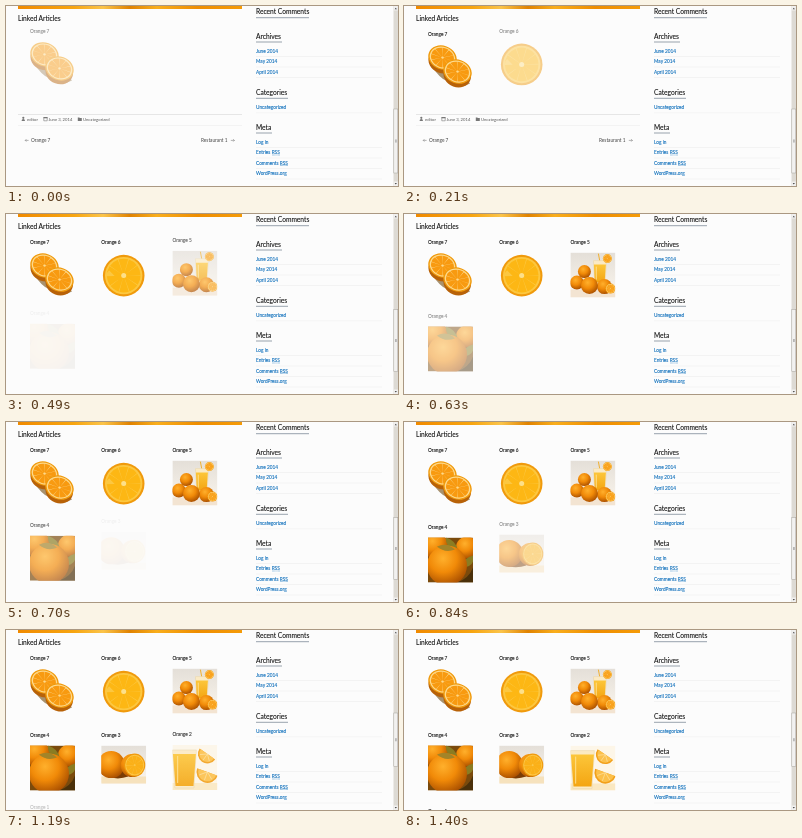
An HTML page for the animation above (2100 ms loop, 392 by 180 pixels).

```html
<!DOCTYPE html>
<html lang="en">
<head>
<meta charset="utf-8">
<style>
html, body { margin: 0; width: 100%; height: 100%; overflow: hidden; background: #fcfcfc; }
svg { display: block; }
text { font: 4.75px Lato, sans-serif; fill: #111; stroke: #111; stroke-width: .08; white-space: pre; }
.head { font-size: 6.65px; }
.link { fill: #0068b8; stroke: #0068b8; }
.meta { font-size: 4.2px; fill: #555; stroke: none; }
.nav { fill: #444; stroke: none; }
</style>
</head>
<body>
<svg id="stage" width="392" height="180" viewBox="0 0 392 180">
  <defs>
    <linearGradient id="banner">
      <stop offset="0" stop-color="#f08a00"/>
      <stop offset=".25" stop-color="#f7a510"/>
      <stop offset=".38" stop-color="#fbc44a"/>
      <stop offset=".5" stop-color="#e08200"/>
      <stop offset=".62" stop-color="#f9ae1c"/>
      <stop offset=".8" stop-color="#ee8d00"/>
      <stop offset="1" stop-color="#f59b08"/>
    </linearGradient>
    <radialGradient id="peel" cx=".4" cy=".32" r=".7">
      <stop offset="0" stop-color="#ffb02c"/>
      <stop offset=".5" stop-color="#f18a08"/>
      <stop offset="1" stop-color="#a94f00"/>
    </radialGradient>
    <linearGradient id="juice" x2="0" y2="1">
      <stop offset="0" stop-color="#fcc63a"/>
      <stop offset="1" stop-color="#f4a512"/>
    </linearGradient>
    <linearGradient id="wall" x2="0" y2="1">
      <stop offset="0" stop-color="#e4dfd8"/>
      <stop offset="1" stop-color="#fbf6ee"/>
    </linearGradient>
  </defs>
  <rect x="12" width="224" height="3" fill="url(#banner)"/>
  <text class="head" x="12" y="15.2">Linked Articles</text>
  <g id="sidebar"></g>
  <g id="items"></g>
  <g id="footer">
    <path d="M12 108.5H236" stroke="#ddd" stroke-width=".7"/>
    <path d="M12 119.5H236" stroke="#f0f0f0" stroke-width=".7"/>
    <g fill="#777">
      <circle cx="17.3" cy="111.8" r="1.1"/>
      <path d="M15.6 115q0-2 1.7-2t1.7 2z"/>
      <path d="M37.8 111.6h3.4v3.2h-3.4z" fill="none" stroke="#777" stroke-width=".6"/>
      <path d="M37.5 111h4v1.2h-4zM71.8 111.4h1.5l.5.6h2v2.9h-4z"/>
    </g>
    <text class="meta" x="21" y="114.6">editor</text>
    <text class="meta" x="42.5" y="114.6">June 3, 2014</text>
    <text class="meta" x="77" y="114.6">Uncategorized</text>
    <text class="nav" x="25" y="136">Orange 7</text>
    <text class="nav" x="195" y="136">Restaurant 1</text>
    <path d="M22.6 134.4H19.2m1.2-1.2-1.2 1.2 1.2 1.2M224.8 134.4h3.6m-1.2-1.2 1.2 1.2-1.2 1.2" fill="none" stroke="#666" stroke-width=".5"/>
  </g>
  <rect x="387.5" width="4.5" height="180" fill="#dddad4"/>
  <path d="M387.8 0h4v4.5h-4zM387.8 175.5h4v4.5h-4z" fill="#f2f1f0"/>
  <path d="M388.7 3.3 389.8 1.8l1.1 1.5zM388.7 177l1.1 1.5 1.1-1.5z" fill="#444"/>
  <g id="thumb">
    <rect x="387.8" width="4" height="1" fill="#f2f1f0" stroke="#a5a29c" stroke-width=".5"/>
    <path stroke="#777" stroke-width=".5"/>
  </g>
</svg>
<script>
const $ = id => document.getElementById(id);
const STEP = 70, LOOP = 2100, LAST = 1400;
const INTERVAL = 210, LEAD = 155, FADE = 330, DROP = 6, ROW = 77;

const ball = (x, y, r) => `<circle cx="${x}" cy="${y}" r="${r}" fill="url(#peel)"/>`;

// Cut orange: peel, pith and ten wedges of flesh.
const slice = (x, y, r, flesh = '#f9a11b', pith = '#fdd277', transform = '') => `
  <g transform="translate(${x} ${y}) ${transform}">
    <circle r="${r}" fill="#f09a0c"/>
    <circle r="${r * .9}" fill="${pith}"/>
    <circle r="${r * .45}" fill="none" stroke="${flesh}" stroke-width="${r * .72}"
      pathLength="10" stroke-dasharray=".93 .07"/>
  </g>`;

// Half an orange lying cut side up, its peel showing below.
const half = (x, y) => `
  <ellipse cx="${x + 1}" cy="${y + 3.5}" rx="14" ry="12" fill="#b86208" transform="rotate(20 ${x} ${y})"/>` +
  slice(x, y, 14.5, '#f89a10', '#fdd98c', 'rotate(20) scale(1 .82)');

const wedge = (x, y, r, turn) => `
  <g transform="translate(${x} ${y}) rotate(${turn})">
    <path d="M${-r} 0a${r} ${r} 0 0 0 ${2 * r} 0z" fill="#f2a01a"/>
    <path d="M${-r * .85} 0a${r * .85} ${r * .85} 0 0 0 ${r * 1.7} 0z" fill="#fcc04a"/>
    <path d="M0 0v${r * .8}M0 0l${r * .6} ${r * .5}M0 0l${-r * .6} ${r * .5}" stroke="#fee4a8" stroke-width=".6"/>
  </g>`;

const glass = (x, y, w, h) => `
  <path d="M${x} ${y}h${w}l${-w * .1} ${h}h${-w * .8}z" fill="#fbeac4" stroke="#e6d3a8" stroke-width=".5"/>
  <path d="M${x + .5} ${y + 4}h${w - 1}l${-w * .1} ${h - 6}h${-w * .75}z" fill="url(#juice)"/>
  <path d="M${x + w * .22} ${y + 6}v${h - 11}" stroke="#ffe08a" stroke-width="1"/>`;

const pictures = [
  `<path d="M4 22Q12 34 18 36q12 10 24 3l-8-10z" fill="#a8926f"/>` + half(14.5, 13) + half(29.5, 27),

  slice(22.5, 23, 20.8, '#fdb714', '#fcc740') + `<circle cx="22.5" cy="23" r="2.5" fill="#fde08a"/>`,

  `<rect width="45" height="45" fill="url(#wall)"/><path d="M0 37h45v8H0z" fill="#f3e4d2"/>
   <path d="M30 12 28 1" stroke="#f0b030" stroke-width="1"/>` +
    glass(23, 8, 13, 24) + slice(37, 6, 4.5) + ball(14, 19, 6.5) +
    ball(6.5, 30, 7) + ball(34, 34, 7.5) + ball(19, 33, 8.5) + slice(40, 36, 5),

  `<rect width="45" height="45" fill="#7a4a0c"/>` + ball(7, 8, 13) + ball(39, 10, 11) +
    `<path d="M18 0q10 3 12 13Q17 11 18 0zM45 18q-9 2-12 12 10 0 12-6z" fill="#8a7c22"/>` +
    ball(19, 28, 20) +
    `<path d="M9 9q10-5 18 3-10 4-18-3z" fill="#a38428"/>
     <path d="M45 30v15H29q12-4 16-15z" fill="#4a300a"/>`,

  `<rect width="45" height="38" fill="url(#wall)"/><path d="M0 31h45v7H0z" fill="#f6e2bd"/>
   <path d="M15 17q7 4 12 0v14q-8 3-18 1z" fill="#7a3c06"/>` +
    ball(10, 19, 13.5) + ball(31, 20, 11.5) +
    slice(33.5, 19.5, 11.5, '#fbb018', '#fcc648', 'scale(.92 1)'),

  `<rect width="45" height="45" fill="#fdf6e8"/><path d="M0 38h45v7H0z" fill="#fae8c2"/>` +
    glass(0, 5, 24, 38) + wedge(35, 9, 9.5, 35) + wedge(35, 27, 11, 20),
  ''
];

$('items').innerHTML = pictures.map((art, i) => {
  const x = 24 + i % 3 * 71.2, y = Math.floor(i / 3) * ROW;
  return `<g><text x="${x}" y="${y + 29.9}">Orange ${7 - i}</text>
    <svg x="${x}" y="${y + 38.6}" width="45" height="45">${art}</svg></g>`;
}).join('');

const sections = [
  ['Recent Comments', 8.3, 53, []],
  ['Archives', 32.6, 26, ['June 2014', 'May 2014', 'April 2014']],
  ['Categories', 88.9, 32, ['Uncategorized']],
  ['Meta', 123.6, 16, ['Log in', 'Entries RSS', 'Comments RSS', 'WordPress.org']]
];
$('sidebar').innerHTML = sections.map(([title, y, width, links]) => `
  <text class="head" x="250" y="${y}">${title}</text>
  <path d="M250 ${y + 3.4}h${width}" stroke="#567" stroke-width=".6"/>` +
  links.map((label, i) => {
    const base = y + 13.9 + i * 10.5;
    const dots = label.endsWith('RSS')
      ? `<path d="M${label[0] === 'E' ? 266 : 274} ${base + 1}h8" stroke="#0068b8" stroke-width=".5" stroke-dasharray=".7 .5"/>` : '';
    return `<text class="link" x="250" y="${base}">${label}</text>${dots}
      <path d="M250 ${base + 4}h126" stroke="#eee" stroke-width=".6"/>`;
  }).join('')).join('');

const items = [...$('items').children];
const [bar, grip] = $('thumb').children;
const thumbs = [[103, 64], [95.5, 62], [83, 53.5]];

function draw(now) {
  const t = Math.min(LAST, Math.floor(now % LOOP / STEP) * STEP);
  items.forEach((item, i) => {
    const p = Math.max(0, Math.min(1, (t - i * INTERVAL + LEAD) / FADE));
    item.setAttribute('opacity', p);
    item.setAttribute('transform', `translate(0 ${DROP * (p - 1)})`);
  });
  // Each new row pushes the footer down and lengthens the page.
  const row = Math.floor((t + LEAD) / (3 * INTERVAL));
  $('footer').setAttribute('transform', `translate(0 ${row * ROW})`);
  const [top, height] = thumbs[row];
  bar.setAttribute('y', top);
  bar.setAttribute('height', height);
  grip.setAttribute('d', `M389 ${top + height / 2 - 1}h1.8m-1.8 1h1.8m-1.8 1h1.8`);
  requestAnimationFrame(() => draw(performance.now()));
}
draw(0);
</script>
</body>
</html>
```
